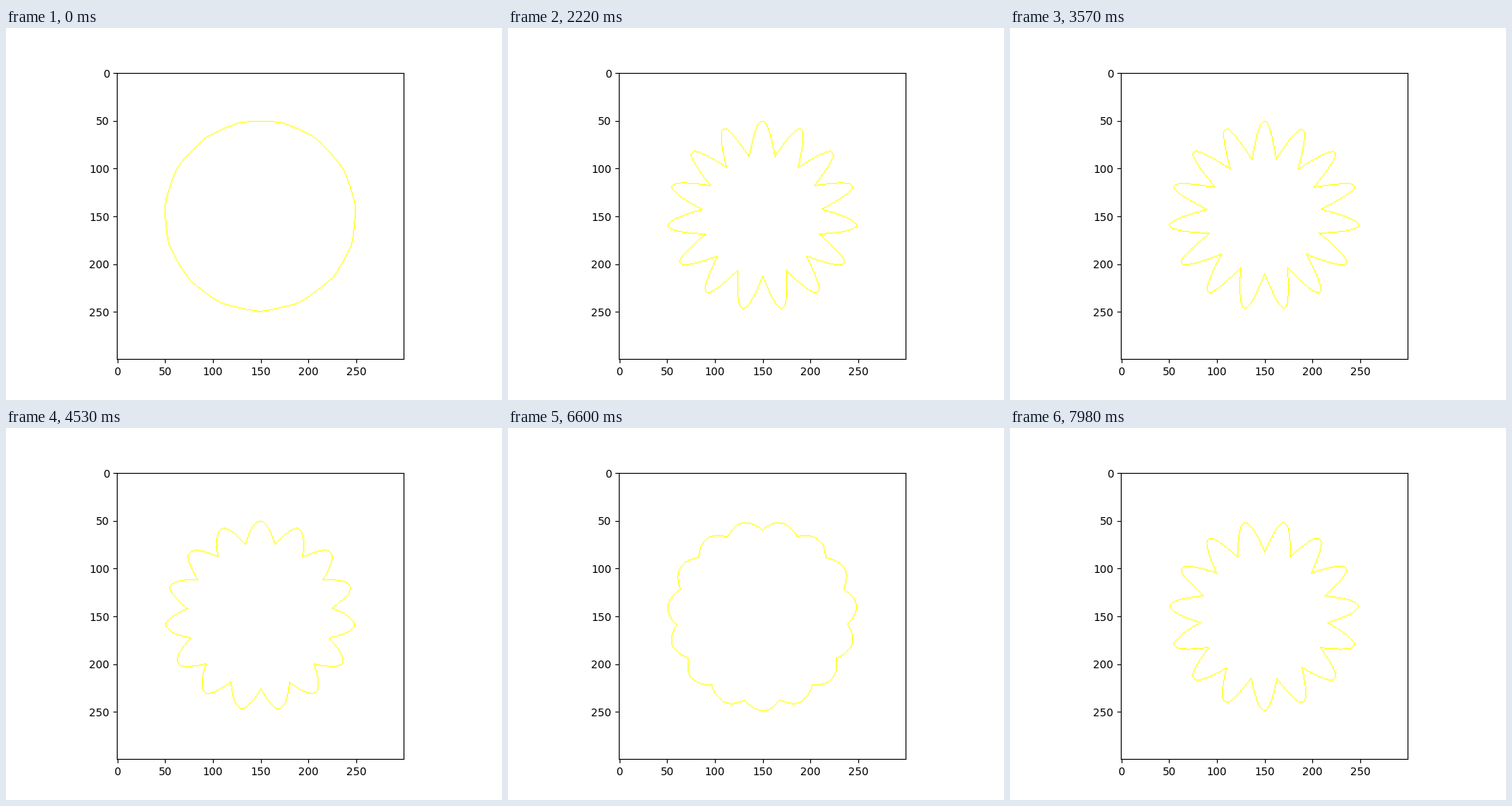
Recreate the animation shown at these times as a matplotlib script. Size 640 by 480 pixels, loop 8000 ms.

```python
import math

import matplotlib.pyplot as plt
import numpy as np
from matplotlib.animation import FuncAnimation

SIZE = 300
CENTER = 150
RADIUS = 100
PETALS = 15
HALF_CYCLE = 200
FRAMES = 267
LOOP_MS = 8000
YELLOW = (255, 255, 0)

T = np.linspace(0, 1, 400)[:, None]


def grid_point(angle, radius, side):
    """Whole-pixel (row, col), with angle 0 at the bottom for side = 1."""
    return np.array([int(CENTER + side * radius * math.cos(angle)),
                     int(CENTER + radius * math.sin(angle))])


def bezier_pixels(start, control, end):
    """One-pixel-wide raster of a quadratic curve."""
    curve = (1 - T) ** 2 * start + 2 * T * (1 - T) * control + T ** 2 * end
    path = []
    for row, col in np.floor(curve + 0.5).astype(int).tolist():
        if path and path[-1] == (row, col):
            continue
        # drop the corner of a staircase step
        if len(path) > 1 and max(abs(row - path[-2][0]),
                                 abs(col - path[-2][1])) <= 1:
            path.pop()
        path.append((row, col))
    return path


def flower(n):
    turn, step = divmod(n, HALF_CYCLE)
    side = 1 if turn % 2 == 0 else -1
    depth = 0.5 * min(step, HALF_CYCLE - 1 - step)
    image = np.full((SIZE, SIZE, 3), 255, np.uint8)
    slot = 2 * math.pi / PETALS
    for k in range(-(PETALS // 2), PETALS // 2 + 1):
        start = grid_point(k * slot, RADIUS - depth, side)
        tip = grid_point((k + 0.5) * slot, RADIUS + depth, side)
        end = grid_point((k + 1) * slot, RADIUS - depth, side)
        rows, cols = zip(*bezier_pixels(start, tip, end))
        image[rows, cols] = YELLOW
    return image


fig, ax = plt.subplots(figsize=(6.4, 4.8), dpi=100)
picture = ax.imshow(flower(0))


def update(n):
    picture.set_data(flower(n))
    return [picture]


anim = FuncAnimation(fig, update, frames=FRAMES, interval=LOOP_MS / FRAMES,
                     repeat=True, repeat_delay=0)
plt.show()
```
